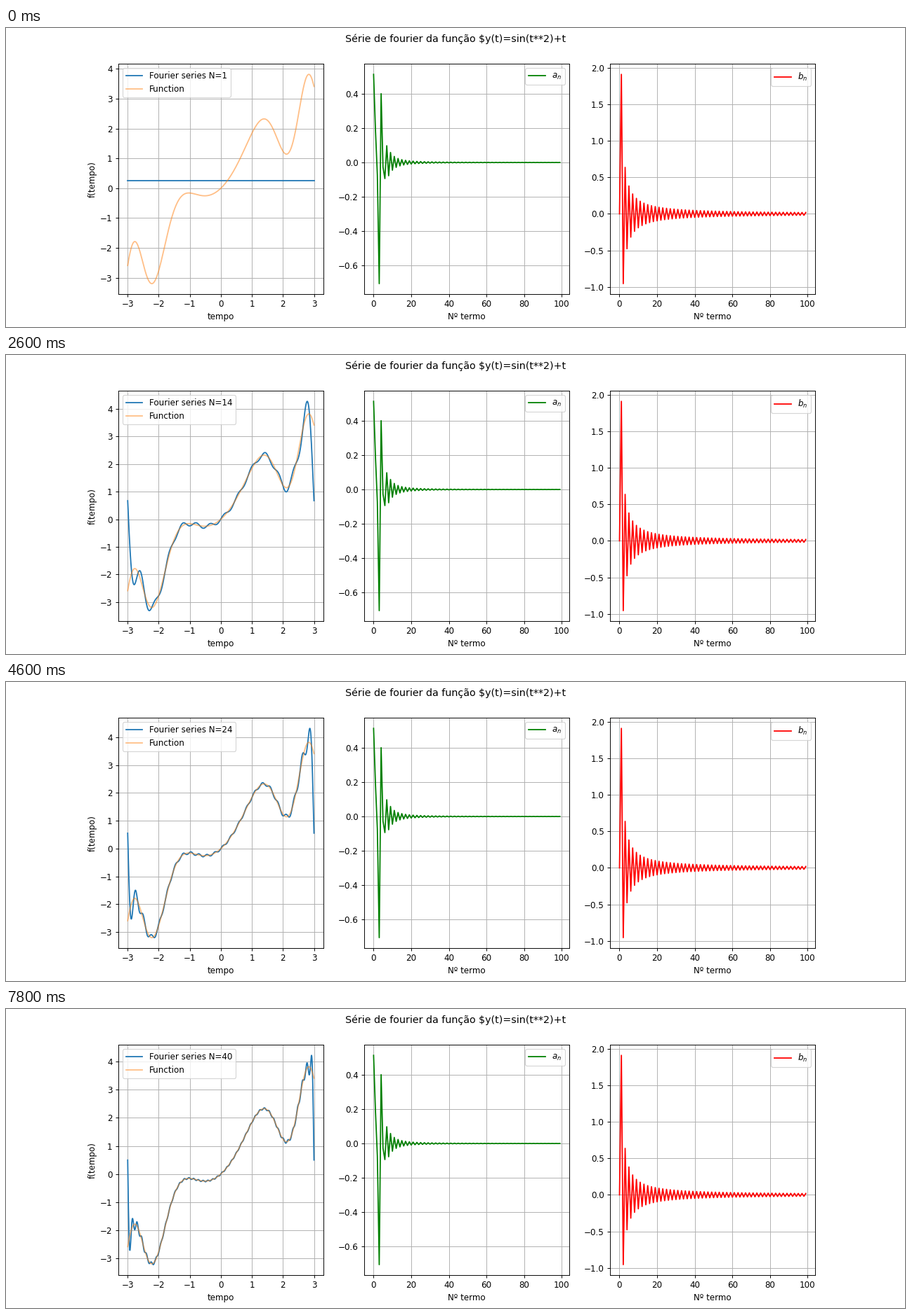
Recreate the animation shown at these times as a matplotlib script. Size 1280 by 427 pixels, loop 8000 ms.

```python
import numpy as np
import matplotlib.pyplot as plt
from matplotlib.animation import FuncAnimation

DPI = 1280 / 15
HALF = 3          # half of the period
TERMS = 100
FRAMES = 40


def func(t):
    return np.sin(t**2) + t


def coefficients(count, samples=12000):
    """Fourier coefficients a_n, b_n by the midpoint rule."""
    t = -HALF + 2 * HALF * (np.arange(samples) + 0.5) / samples
    y = func(t)
    angle = np.pi * np.arange(count)[:, None] * t / HALF
    return 2 * np.mean(y * np.cos(angle), axis=1), 2 * np.mean(y * np.sin(angle), axis=1)


n = np.arange(TERMS)
a, b = coefficients(TERMS)
t = np.linspace(-HALF, HALF, 1000)
angles = np.pi * n[:FRAMES, None] * t / HALF
waves = a[:FRAMES, None] * np.cos(angles) + b[:FRAMES, None] * np.sin(angles)
waves[0] = a[0] / 2
partial_sums = np.cumsum(waves, axis=0)

fig, (ax, ax_a, ax_b) = plt.subplots(1, 3, figsize=(15, 427 / DPI), dpi=DPI)
fig.suptitle("Série de fourier da função $y(t)=sin(t**2)+t")

series, = ax.plot(t, partial_sums[0], label="Fourier series N=1")
ax.plot(t, func(t), alpha=0.5, label="Function")
ax.set_xlabel("tempo")
ax.set_ylabel("f(tempo)")
ax.grid()
legend = ax.legend(loc="upper left")

for axis, values, color, label in ((ax_a, a, "green", "$a_n$"), (ax_b, b, "red", "$b_n$")):
    axis.plot(n, values, color=color, label=label)
    axis.set_xlabel("Nº termo")
    axis.grid()
    axis.legend(loc="upper right")


def update(frame):
    series.set_ydata(partial_sums[frame])
    legend.get_texts()[0].set_text(f"Fourier series N={frame + 1}")
    ax.relim()
    ax.autoscale_view()
    return series, legend


anim = FuncAnimation(fig, update, frames=FRAMES, interval=200, repeat=True, repeat_delay=0)
plt.show()
```
